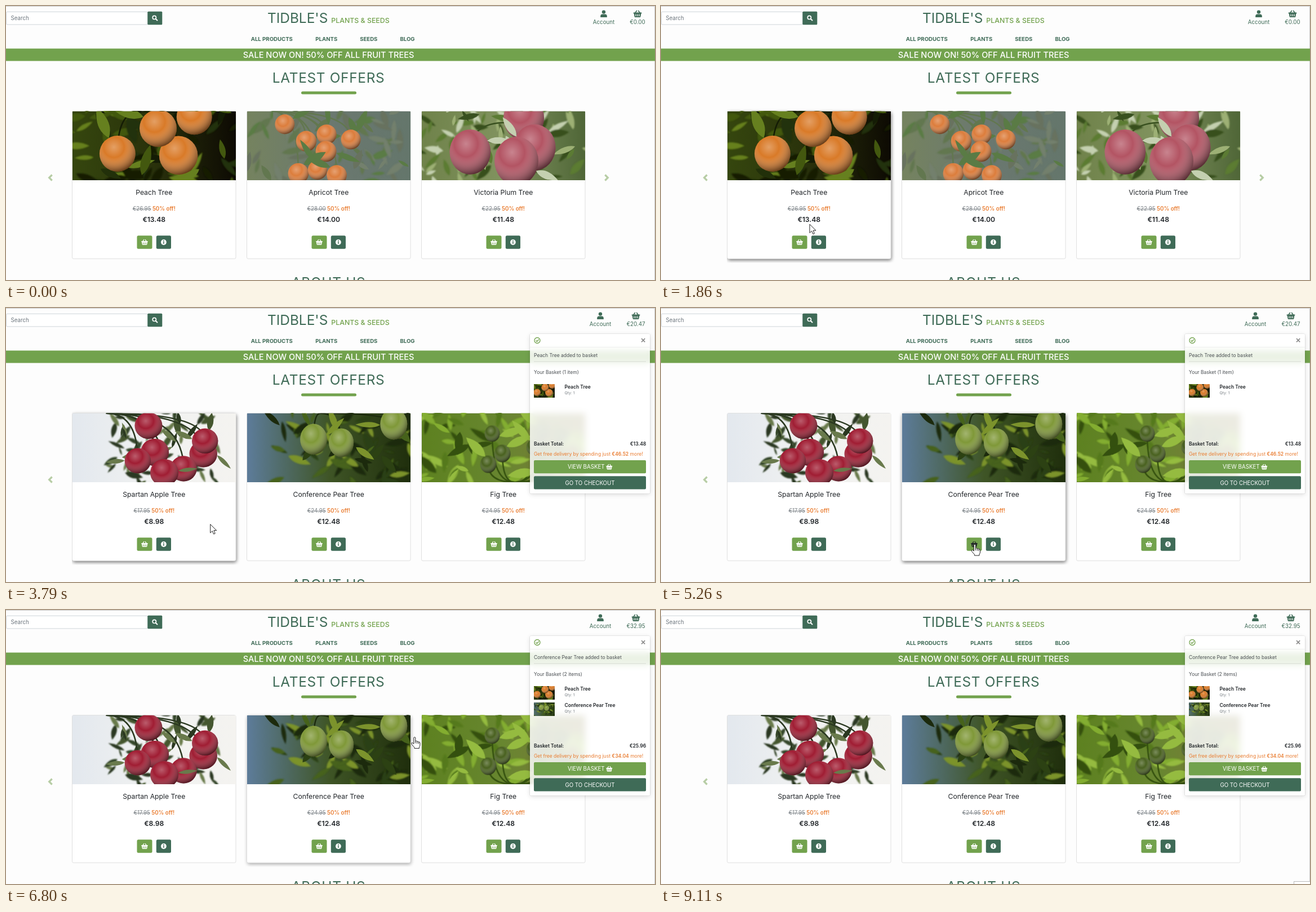
Write an HTML page that moves like this. It is 1152 by 486 pixels and loops after 9160 ms.

```html
<!DOCTYPE html>
<html lang="en">
<head>
<meta charset="utf-8">
<title>Plant shop</title>
<style>
html, body { margin: 0; width: 100%; height: 100%; overflow: hidden; background: #fdfdfd }
svg { position: absolute; left: 0; top: 0; display: block; font-family: Inter, sans-serif }
#toast { position: absolute; left: 930px; top: 46px; width: 213px; height: 283px; border-radius: 2px;
  background: rgba(255,255,255,.85); backdrop-filter: blur(6px);
  box-shadow: 0 0 0 .6px rgba(0,0,0,.12), 0 2px 8px rgba(0,0,0,.13) }
</style>
</head>
<body>
<svg id="page" width="1152" height="486"></svg>
<div id="toast"><svg id="basket" width="213" height="283" viewBox="930 46 213 283"></svg></div>
<svg id="top" width="1152" height="486"></svg>
<script>
const LOOP = 9160, LOADS = [2950, 6260];
const DARK = '#3f6b57', GREEN = '#72a24d', ORANGE = '#e97c30', INK = '#212529', GREY = '#7d8388', SOFT_INK = '#4a4f53';
const SMALL = 8.54, BASE = 9.75, LARGE = 12.2, HEAD = 24.4;
const $ = id => document.getElementById(id);
const euro = n => '€' + n.toFixed(2);

// ---- drawing helpers
const text = (x, y, size, weight, fill, str, anchor = 'middle', more = '') =>
  `<text x="${x}" y="${y}" font-size="${size}" font-weight="${weight}" fill="${fill}" text-anchor="${anchor}" ${more}>${str}</text>`;
const rect = (x, y, w, h, fill, r = 0, more = '') =>
  `<rect x="${x}" y="${y}" width="${w}" height="${h}" fill="${fill}" rx="${r}" ${more}/>`;
const ellipse = (x, y, rx, ry, fill, more = '') =>
  `<ellipse cx="${x}" cy="${y}" rx="${rx}" ry="${ry}" fill="${fill}" ${more}/>`;
const line = (d, stroke, w = 1) => `<path d="${d}" fill="none" stroke="${stroke}" stroke-width="${w}"/>`;
const photo = (id, x, y, w, h) => `<use href="#${id}" x="${x}" y="${y}" width="${w}" height="${h}"/>`;
const basketIcon = (x, y, w, color, id = '') =>
  `<g id="${id}" color="${color}" transform="translate(${x} ${y}) scale(${w / 24}) translate(-12 -12)">` +
  line('M5 9L10 2M19 9L14 2', 'currentColor', 2.6) +
  '<path fill="currentColor" fill-rule="evenodd" d="M0 8H24V11H22.5L21 20Q20.6 22 19 22H5Q3.4 22 3 20L1.5 11H0Z' +
  [6, 11, 16].map(s => `M${s} 13h2v6h-2Z`).join('') + '"/></g>';

// ---- photographs: a gradient, seeded foliage, and fruit hanging from one stem point
const photos = {
  peach: { bg: ['#35460e', '#29310b', '#0d0a03'], leaf: ['#141c05', '#43580f', '#22300a', '#66801f'], blade: 58,
    fruit: '#d97a28', r: 33, tall: 1, stem: [120, 0], at: [[216, 10], [188, 78], [152, 30], [80, 75]] },
  apricot: { bg: ['#75835f', '#6b7870', '#64766b'], leaf: ['#62774f', '#73806d', '#68725f', '#5a7b45'], blade: 45,
    fruit: '#dc7d3c', r: 18, tall: 1, stem: [46, 0], at: [[67, 23], [105, 53], [141, 41], [140, 71], [184, 50], [91, 110], [125, 104], [159, 113]] },
  plum: { bg: ['#6f824a', '#81935f', '#4f6637'], leaf: ['#38501f', '#9db075', '#5b7b33', '#c4d0b0'], blade: 42,
    fruit: '#b35463', r: 37, tall: 1.1, stem: [150, 20], at: [[181, 12], [200, 64], [86, 72], [168, 88]] },
  apple: { bg: ['#e3e8ee', '#f1f2f1', '#f4f3f0'], leaf: ['#2a3820', '#44562f', '#36472a', '#697a4c'], blade: 34, span: [70, 250],
    fruit: '#a01d33', r: 24, tall: .96, stem: [60, 0], at: [[232, 72], [197, 98], [135, 22], [146, 69], [116, 84], [235, 49], [163, 105]] },
  pear: { bg: ['#5d7c9a', '#3f5526', '#1f2e0c'], leaf: ['#1c2a0d', '#46621b', '#2c4113', '#7c932c'], blade: 44, span: [55, 290],
    fruit: '#7f9838', r: 23, tall: 1.15, stem: [130, 0], at: [[260, 19], [118, 46], [167, 52]] },
  fig: { bg: ['#5d8120', '#688630', '#80783c'], leaf: ['#34500f', '#83ad30', '#55791c', '#95bb40'], blade: 48,
    fruit: '#49611f', r: 14, tall: 1.08, stem: [165, 122], at: [[125, 36], [143, 71], [118, 90], [199, 60], [213, 32], [249, 43], [242, 79], [213, 99]] }
};
let seed = 11;
const rnd = (lo = 0, hi = 1) => lo + (hi - lo) * ((seed = seed * 16807 % 2147483647) / 2147483647);
const leaf = (x, y, angle, len, fill) => {
  const w = len * rnd(.2, .36);
  return `<path transform="translate(${x} ${y}) rotate(${angle})" d="M0 0Q${len * .4} ${w} ${len} 0Q${len * .4} ${-w} 0 0" fill="${fill}"/>` ;
};
function drawPhoto([id, p]) {
  const [x0, x1] = p.span || [-15, 290], [sx, sy] = p.stem;
  const foliage = n => Array.from({ length: n }, (_, i) =>
    leaf(rnd(x0, x1), rnd(-10, 130), rnd(0, 360), p.blade * rnd(.45, 1), p.leaf[i % 4])).join('');
  const stems = p.at.map(([x, y]) => line(`M${sx} ${sy}Q${x} ${sy} ${x} ${y}`, p.leaf[0], 2.5)).join('');
  const fruit = p.at.map(([x, y]) => {
    const r = p.r * rnd(.95, 1.05), a = rnd(150, 390);
    return [p.fruit, 'url(#shade)'].map(f => ellipse(x, y, r, r * p.tall, f)).join('') +
      leaf(x + r * Math.cos(a * Math.PI / 180), y + r * Math.sin(a * Math.PI / 180), a + rnd(-40, 40), p.blade, p.leaf[3]);
  }).join('');
  return `<linearGradient id="${id}Bg">` + p.bg.map((c, i) => `<stop offset="${i / 2}" stop-color="${c}"/>`).join('') +
    `</linearGradient><symbol id="${id}" viewBox="0 0 290 122" preserveAspectRatio="xMidYMid slice">` +
    rect(0, 0, 290, 122, `url(#${id}Bg)`) + `<g filter="url(#soft)">${foliage(65)}</g>` + foliage(14) + stems + fruit + '</symbol>';
}

// ---- page
const CARD_W = 290.5, CARDS = [0, 1, 2], cardX = i => 117.5 + 310 * i;
const sets = [
  [['peach', 'Peach Tree', 26.95], ['apricot', 'Apricot Tree', 28], ['plum', 'Victoria Plum Tree', 22.95]],
  [['apple', 'Spartan Apple Tree', 17.95], ['pear', 'Conference Pear Tree', 24.95], ['fig', 'Fig Tree', 24.95]]
];
const half = price => Math.ceil(price * 50) / 100;
const product = ([id, title, price], i) => {
  const x = cardX(i), c = x + CARD_W / 2;
  return photo(id, x + .5, 186.7, 290, 122.3) + text(c, 335.2, LARGE, 400, INK, title) +
    text(c, 363.2, BASE, 400, GREY, `<tspan text-decoration="line-through">${euro(price)}</tspan><tspan font-weight="600" fill="${ORANGE}"> 50% off!</tspan>`) +
    text(c, 383, LARGE, 600, INK, euro(half(price)));
};
const cardFrame = i => {
  const x = cardX(i), info = x + 162.4;
  return rect(x, 186.5, CARD_W, 261.8, '#fff', 2.5, 'stroke="#dfdfdf"') +
    rect(x + 113, 405.3, 31, 27.4, '#b4cf9f', 4, `id="ring${i}"`) +
    rect(x + 115, 407.3, 27, 23.4, GREEN, 2.5) + basketIcon(x + 128.5, 419, 11.6, '#fff', 'icon' + i) +
    rect(x + 149.3, 407.3, 26.2, 23.4, DARK, 2.5) + ellipse(info, 419, 4.9, 4.9, '#fff') +
    line(`M${info} 415.6v1.8M${info} 418.2v3.6`, DARK, 1.6);
};
const nav = [['ALL PRODUCTS', 471.8], ['PLANTS', 568.8], ['SEEDS', 643.8], ['BLOG', 712.5]];
const heading = (y, str) => text(572.6, y, HEAD, 400, DARK, str, 'middle', 'letter-spacing=".7"');

$('page').innerHTML = `<defs>
  <filter id="soft"><feGaussianBlur stdDeviation=".8"/></filter>
  <filter id="blur" x="-10%" y="-10%" width="120%" height="120%"><feGaussianBlur stdDeviation="3"/></filter>
  <clipPath id="frame">${rect(117, 180, 918, 275.5, '#000')}</clipPath>
  <radialGradient id="shade" cx=".4" cy=".32" r=".72"><stop offset="0" stop-color="#fff" stop-opacity=".28"/>
  <stop offset=".4" stop-color="#fff" stop-opacity="0"/><stop offset="1" stop-opacity=".6"/></radialGradient></defs>` +
  Object.entries(photos).map(drawPhoto).join('') +
  rect(0, 0, 1152, 486, '#fdfdfd') + line('M0 .5H1151.5V486', '#cbcbcb') +
  rect(.5, 10.3, 251, 22.6, '#fff', 2, 'stroke="#ced4da"') + text(8.5, 25, BASE, 400, '#6c757d', 'Search', 'start') +
  rect(251.3, 9.8, 26, 23.5, DARK, 1.5) +
  ellipse(263.3, 20.4, 3.1, 3.1, 'none', 'stroke="#fff" stroke-width="1.7"') + line('M265.6 22.7L269 26', '#fff', 2) +
  text(571.3, 30, HEAD, 400, DARK, "TIDBLE'S", 'end') + text(577.3, 30.3, 12.35, 500, GREEN, 'PLANTS &amp; SEEDS', 'start') +
  nav.map(([s, x]) => text(x, 62.2, 9.65, 700, DARK, s)).join('') +
  '<g id="account">' + ellipse(1061, 10.6, 3.2, 3.2, DARK) +
  `<path d="M1055.2 20v-2q0-3.5 3.5-3.5h4.6q3.5 0 3.5 3.5v2Z" fill="${DARK}"/>` +
  text(1061, 32.4, BASE, 400, DARK, 'Account') + '</g><g id="cart">' + basketIcon(1121, 14, 14.5, DARK) +
  text(1121, 32.4, BASE, 400, DARK, '', 'middle', 'id="sum"') + '</g>' +
  rect(0, 75.5, 1152, 22, GREEN) + text(572.6, 91.8, 14.6, 500, '#fff', 'SALE NOW ON! 50% OFF ALL FRUIT TREES') +
  heading(135.7, 'LATEST OFFERS') + rect(524, 151.5, 98, 5, GREEN, 2.5) + heading(498.7, 'ABOUT US') +
  line('M81.7 299.5l-5 5 5 5M1063.3 299.5l5 5-5 5', '#b7cda5', 3.2) +
  '<g clip-path="url(#frame)">' + CARDS.map(i => rect(cardX(i) + 1, 189, CARD_W, 262, '#000', 3, `id="shadow${i}" filter="url(#blur)"`)).join('') + '</g>' +
  CARDS.map(cardFrame).join('') +
  sets.map((set, k) => `<g id="set${k}">${set.map(product).join('')}</g>`).join('');

// ---- basket popup
const label = (y, str, weight = 400, fill = SOFT_INK, x = 937, size = SMALL) => text(x, y, size, weight, fill, str, 'start');
const entry = ([id, name], i) => {
  const y = 135 + 29 * i;
  return photo(id, 937, y, 37, 24) + label(y + 7.5, name, 600, INK, 991.5) + label(y + 17.5, 'Qty: 1', 400, GREY, 991.5, 6.8);
};
const chosen = [sets[0][0], sets[1][1]], FREE_DELIVERY = 60, DELIVERY = 6.99;
const total = n => chosen.slice(0, n).reduce((sum, p) => sum + half(p[2]), 0);
const bill = n => `<g id="bill${n}">` + label(86.6, chosen[n - 1][1] + ' added to basket') +
  label(117.2, `Your Basket (${n} item${n > 1 ? 's' : ''})`) + chosen.slice(0, n).map(entry).join('') +
  text(1136.3, 244.2, SMALL, 600, INK, euro(total(n)), 'end') +
  label(262, `Get free delivery by spending just <tspan font-weight="600">${euro(FREE_DELIVERY - total(n))}</tspan> more!`, 400, ORANGE) + '</g>';
$('basket').innerHTML = line('M930 69.5H1143', 'rgba(0,0,0,.05)') + line('M937 95H1136', 'rgba(0,0,0,.12)') +
  ellipse(943, 57.5, 5, 5, 'none', `stroke="${GREEN}" stroke-width="1.3"`) + line('M940.5 57.6l1.9 1.9 3.3-3.8', GREEN, 1.4) +
  line('M1128 54.2l6.2 6.2m0-6.2l-6.2 6.2', '#8c8c8c', 1.7) +
  bill(1) + bill(2) + label(244.2, 'Basket Total:', 600, INK) +
  rect(937, 270, 199, 23.3, GREEN, 2) + text(1029.8, 285.4, BASE, 400, '#fff', 'VIEW BASKET') + basketIcon(1070.8, 281.8, 11, '#fff') +
  rect(937, 298.3, 199, 23.3, DARK, 2) + text(1036.5, 313.6, BASE, 400, '#fff', 'GO TO CHECKOUT');

// ---- pointer
$('top').innerHTML = rect(1123.5, 481.5, 40, 12, '#fff', 0, 'stroke="#b9b9b9" id="corner"') +
  `<g id="pointer" fill="#fff" stroke="#222" stroke-linejoin="round">
  <path id="arrow" d="M0 0v15.3l3.6-3.3 2.4 5.5 2.5-1.1-2.3-5.4h4.8Z"/>
  <path id="hand" d="M-1.6 1.6a1.5 1.5 0 0 1 3 0V7q2.5-.8 2.8.8 2.4-.8 2.8 1 2.5-.6 2.5 1.7V14q0 2-1.5 4v2h-8.5v-1.7l-5-5.8q-1-2.3 1.2-2.5l2.7 2ZM1.4 7v4M4.3 8v3.5M7 9v3"/></g>`;
// each move: start, end, and the point it eases to
const START = [1060, 474];
const moves = [[140, 920, 575, 330], [1120, 1860, 264, 387], [1860, 2290, 245, 416], [3500, 3790, 362, 384], [3790, 4380, 567, 257],
  [4780, 5260, 557, 419], [6650, 6800, 725, 225], [6800, 7550, 880, 372], [7620, 7820, 1092, 484]];
function pointerAt(t) {
  let [x, y] = START;
  for (const [from, to, px, py] of moves) {
    const u = Math.min(1, Math.max(0, (t - from) / (to - from))), ease = u * (2 - u);
    x += (px - x) * ease;
    y += (py - y) * ease;
  }
  return [x, y];
}
const cardAt = ([x, y], pad = 0) => y < 186 || y > 448 ? -1 : CARDS.findIndex(i => x >= cardX(i) && x <= cardX(i) + CARD_W + pad);
const show = (id, on) => $(id).style.opacity = +on;

function draw() {
  const t = performance.now() % LOOP, visit = LOADS.filter(l => t >= l).length;
  const ready = visit ? LOADS[visit - 1] + 60 : 0, awake = t >= ready;
  const at = pointerAt(t), [x, y] = at, card = cardAt(at), inCard = x - cardX(card);
  const onButton = card >= 0 && y > 407 && y < 431 && inCard > 115 && inCard < 142;
  const pressed = t >= 2540 && t < LOADS[0] || t >= 5870 && t < LOADS[1];
  for (const i of CARDS) {
    // a hover shadow fades over the last 150 ms
    let amount = 0;
    for (let k = 0; k < 5; k++) amount += (cardAt(pointerAt(Math.max(t - k * 30, ready))) === i) / 5;
    show('shadow' + i, awake * amount * .55);
    show('ring' + i, pressed && card === i);
    $('icon' + i).setAttribute('color', awake && onButton && card === i ? INK : '#fff');
  }
  sets.forEach((_, k) => $('set' + k).style.display = k === Math.min(visit, 1) ? '' : 'none');
  $('account').setAttribute('transform', `translate(${visit ? -6 : 0})`);
  $('cart').setAttribute('transform', `translate(${visit ? -3 : 0})`);
  $('sum').textContent = euro(visit && total(visit) + DELIVERY);
  $('toast').style.display = visit && awake ? '' : 'none';
  show('bill1', visit === 1);
  show('bill2', visit === 2);
  const hand = onButton || y < 309 && cardAt(at, 8) >= 0;
  show('hand', hand);
  show('arrow', !hand);
  show('pointer', t >= 140 && t < 7820);
  $('pointer').setAttribute('transform', `translate(${x} ${y})`);
  show('corner', t >= 8350);
  requestAnimationFrame(draw);
}
draw();
</script>
</body>
</html>
```
